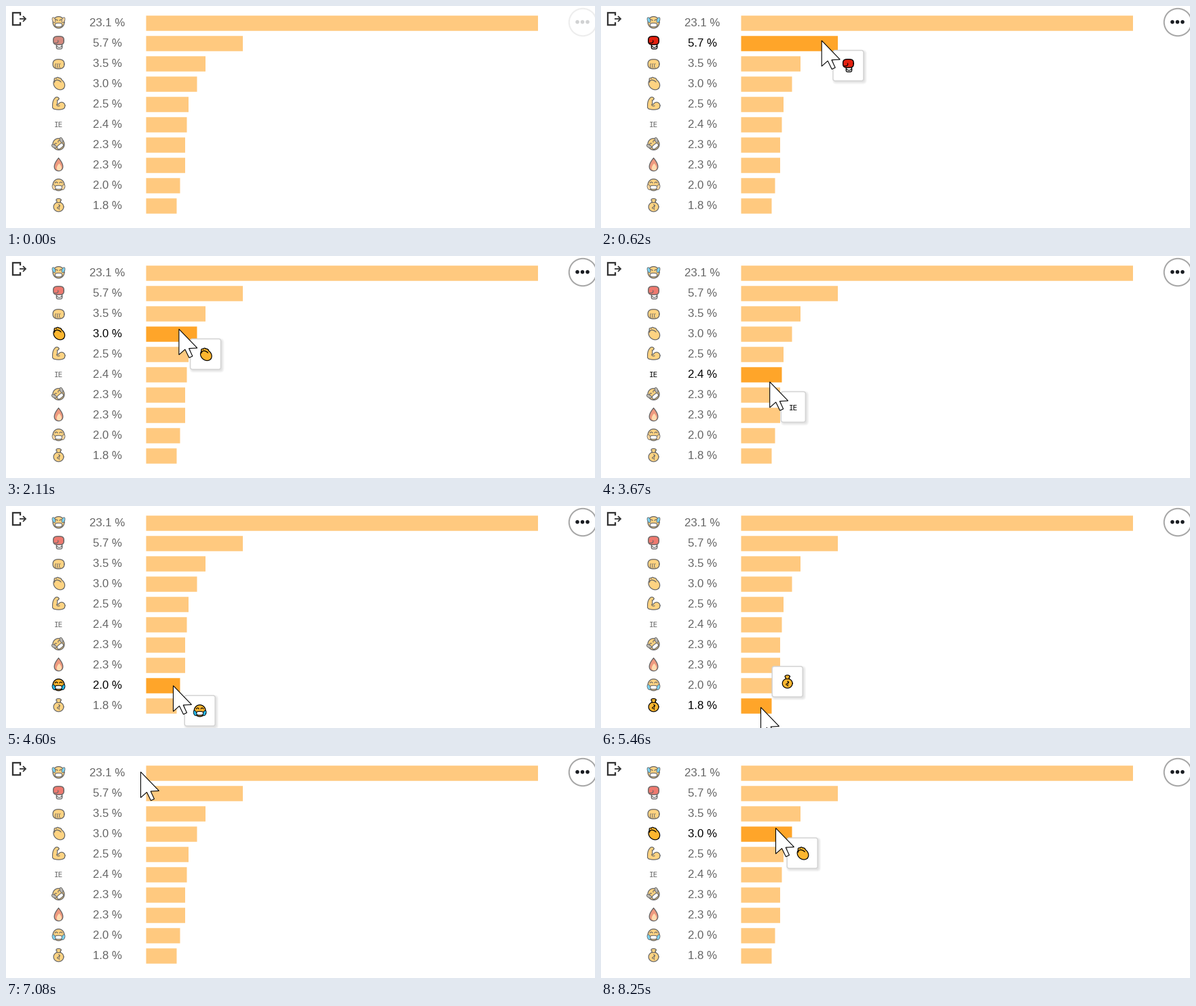
Recreate the animation shown at these times as a matplotlib script. Size 868 by 328 pixels, loop 8.88 s.

```python
import numpy as np
import matplotlib.pyplot as plt
from matplotlib.animation import FuncAnimation
from matplotlib.colors import to_rgb
from matplotlib.patches import Circle, FancyBboxPatch, PathPatch, Polygon, Rectangle
from matplotlib.path import Path
from matplotlib.transforms import Affine2D

W, H, DPI = 868, 328, 64
LOOP, INTERVAL = 8880, 60
STEPS = 114                      # pointer positions per loop
STEP = LOOP / STEPS

INK, WHITE, AMBER, ORANGE = "#000000", "#ffffff", "#fdb62f", "#ffa529"
BLUE, RED, GREEN, GREY = "#26b4e3", "#e3200f", "#2c9a4a", "#8a857c"
DULL = {BLUE: "#f6bd62", RED: "#b93a28", GREEN: "#4a4238"}
REST = 0.6                       # opacity of rows that are not hovered

SHARES = [23.1, 5.7, 3.5, 3.0, 2.5, 2.4, 2.3, 2.3, 2.0, 1.8]
BAR_X, BAR_Y, BAR_H, ROW_H, SCALE = 206.5, 14.25, 22.5, 30, 25

# pointer stops: arrival step, steps on the way, x, y
START = (860, 15)
STOPS = [
    (12, 12, 288, 53), (17, 1, 286, 64), (22, 5, 255, 89), (29, 3, 254, 118),
    (32, 1, 252, 130), (33, 1, 250, 118), (43, 6, 249, 141), (49, 4, 248, 195),
    (56, 4, 247, 246), (62, 4, 245, 283), (70, 4, 235, 297), (80, 7, 240, 250),
    (82, 2, 240, 238), (91, 7, 198, 23), (99, 5, 256, 122), (106, 3, 257, 106)]

fig = plt.figure(figsize=(W / DPI, H / DPI), dpi=DPI, facecolor="white")
ax = fig.add_axes([0, 0, 1, 1])
ax.set(xlim=(0, W), ylim=(H, 0))
ax.axis("off")


def px(size):
    return size * 72 / DPI


def mix(color, alpha):
    return tuple(1 - (1 - c) * alpha for c in to_rgb(color))


def oval(cx, cy, rx, ry, tilt=0, start=0, end=360, power=1):
    """Ellipse or arc; a power below 1 makes it squarer."""
    a, t = np.radians(np.linspace(start, end, 40)), np.radians(tilt)
    c, s = np.cos(a), np.sin(a)
    x = rx * np.sign(c) * np.abs(c) ** power
    y = ry * np.sign(s) * np.abs(s) ** power
    return np.column_stack([cx + x * np.cos(t) - y * np.sin(t),
                            cy + x * np.sin(t) + y * np.cos(t)])


def drop(cx, cy, rx, ry):
    a = np.linspace(0, 2 * np.pi, 40)
    return np.column_stack([cx + rx * np.sin(a) * np.sin(a / 2), cy - ry * np.cos(a)])


def shape(points, fill, width=1.3):
    return points, fill, width


def arc(*args, width=1.1, **kw):
    return oval(*args, **kw), None, width


def stroke(*points, width=1.1):
    return np.array(points, float), None, width


def merged(*outlines):
    """Several outlines drawn as one body."""
    return [shape(o, AMBER, 2.4) for o in outlines] + [shape(o, AMBER, 0) for o in outlines]


def turned(parts, degrees):
    rot = Affine2D().rotate_deg(degrees)
    return [(rot.transform(p), fill, width) for p, fill, width in parts]


def laughing(tear, height):
    parts = [shape(oval(0, 0, 8.4, 8.6), AMBER),
             shape(oval(0, 3.8, 5.2, 2.8, power=.7), WHITE, 1.1)]
    for side in (-1, 1):
        parts += [arc(3.4 * side, -2.2, 1.9, 1.9, start=190, end=350),
                  shape(oval(7 * side, height, 2.2, 4, tilt=20 * side), tear, .8)]
    return parts


def glove():
    return [shape(oval(1, 5.5, 4.2, 3.8, power=.5), WHITE, 1.3),
            arc(1, 5, 3, 2, start=0, end=180),
            shape(oval(0, -3.2, 7.8, 6.2, power=.65), RED, 1.4),
            arc(-4, -2, 3.4, 2.6, start=-30, end=120)]


def fist():
    fingers = [arc(x, 4, 1.5, 3, start=90, end=270, width=.9) for x in (-3.5, -.5, 2.5)]
    return [shape(oval(0, 1.6, 8.4, 7, power=.8), AMBER)] + fingers


def clapping():
    fingers = [oval(3 * i - 1, abs(i) - 6.2, 1.6, 2.2, tilt=-35) for i in (-1, 0, 1)]
    return merged(*fingers, oval(.8, 1.4, 8.4, 6.8, tilt=42)) + [
        arc(0, 1, 7, 4.6, tilt=42, start=150, end=275, width=1.3)]


def biceps():
    return merged(oval(-5.4, 0, 2.8, 7.5, tilt=8), oval(-2.6, -7.2, 2.4, 1.8),
                  oval(0, 5, 8.4, 3.4), oval(4.4, 3, 4.4, 4.4)) + [
        arc(0, 1, 3, 2.6, start=60, end=170)]


def flame():
    return [shape(drop(0, 0, 8.2, 9.5), "#e2552a"),
            shape(drop(.8, 3.6, 4.6, 5.2), "#ffc47c", 0)]


def money_bag():
    t = np.linspace(-1, 1, 20)
    sign = np.column_stack([-2 * np.sin(np.pi * t), 2.5 + 3 * t])
    return merged(oval(0, -7.6, 3, 1.4), oval(0, -5, 2, 2.6), oval(0, 2.6, 6.8, 6.4)) + [
        (sign, None, 1), stroke((0, -1.6), (0, 6.6), width=.7),
        stroke((-2.4, -4.6), (2.4, -4.6))]


ICONS = [laughing(BLUE, -3.5), glove(), fist(), clapping(), biceps(), None,
         turned(laughing(GREY, -2), -40), flame(), laughing(BLUE, 3.5), money_bag()]


class Icon:
    def __init__(self, parts, x=0, y=0, z=2):
        self.place = Affine2D().translate(x, y)
        trans = self.place + ax.transData
        self.parts, self.label = [], None
        if parts is None:
            self.label = ax.text(0, 1.6, "IE", family="DejaVu Sans Mono", size=px(11),
                                 ha="center", va="center", transform=trans, zorder=z)
            return
        for points, fill, width in parts:
            patch = PathPatch(Path(points), transform=trans, zorder=z, lw=px(width),
                              joinstyle="round", capstyle="round")
            self.parts.append((ax.add_patch(patch), fill, width))

    def paint(self, alpha, dull=False):
        if self.label:
            self.label.set_color(mix(INK, alpha))
        for patch, fill, width in self.parts:
            tone = DULL.get(fill, fill) if dull else fill
            patch.set_facecolor(mix(tone, alpha) if tone else "none")
            patch.set_edgecolor(mix(INK, alpha) if width else "none")

    def show(self, on):
        for artist in [p for p, _, _ in self.parts] or [self.label]:
            artist.set_visible(on)


def line(points, width):
    ax.plot(*zip(*points), color="#333333", lw=px(width), zorder=3,
            solid_joinstyle="miter", solid_capstyle="butt")


def tip(step):
    pos = np.array(START, float)
    for arrival, travel, x, y in STOPS:
        part = np.clip((step - arrival + travel) / travel, 0, 1)
        pos += (1 - (1 - part) ** 2.5) * (np.array([x, y]) - pos)
    return pos


def hovered(step):
    if step < 1:
        return None
    x, y = tip(step)
    for row, share in enumerate(SHARES):
        top = BAR_Y + row * ROW_H
        if BAR_X <= x <= BAR_X + share * SCALE and top <= y <= top + BAR_H:
            return row
    return None


HOVER = [hovered(n) for n in range(STEPS)]
FIRST = {row: HOVER.index(row) for row in set(HOVER) - {None}}

# chart rows
bars, labels, icons = [], [], []
for row, share in enumerate(SHARES):
    y = row * ROW_H
    bars.append(ax.add_patch(Rectangle((BAR_X, BAR_Y + y), share * SCALE, BAR_H,
                                       lw=0, snap=False)))
    labels.append(ax.text(149.5, 30 + y, f"{share:.1f} %", family="Liberation Sans",
                          size=px(16.8), ha="center", va="baseline"))
    icons.append(Icon(ICONS[row], 77.5, 24.2 + y))

# export icon
line([(21, 14), (21, 10), (9.6, 10), (9.6, 28), (21, 28), (21, 24)], 2.3)
line([(19.5, 19), (29, 19)], 1.8)
line([(25, 15), (29, 19), (25, 23)], 1.8)

# menu button
ring = ax.add_patch(Circle((850, 24), 20.2, fc="white", lw=px(2), zorder=3))
dots = [ax.add_patch(Circle((849.5 + 7.5 * i, 23.6), 2.8, lw=0, zorder=4))
        for i in (-1, 0, 1)]

# tooltip
CARD, NARROW = 45, 36            # side of the card, width around the short text
tip_place = Affine2D()
tip_trans = tip_place + ax.transData


def card(offset, grow, z, **style):
    corner = offset - grow
    return ax.add_patch(FancyBboxPatch(
        (corner, corner), CARD + 2 * grow, CARD + 2 * grow, transform=tip_trans,
        boxstyle=f"round,pad=0,rounding_size={3 + grow}", zorder=z, **style))


cards = [(card(2, g, 5, fc="black", lw=0, alpha=.028), g) for g in range(4)]
cards.append((card(0, 0, 6, fc="white", ec="#d4d4d4", lw=px(1.5)), 0))
tip_icons = [Icon(parts, z=7) for parts in ICONS]
for icon in tip_icons:
    icon.paint(1)

# pointer
ARROW = np.array([(0, 0), (0, 38), (9, 30), (15, 42.3), (20, 40), (14.7, 28.6), (27, 28)])
pointer = ax.add_patch(Polygon(ARROW, fc="white", ec="black", lw=px(1.1), zorder=10))


def draw_tooltip(row, x, y):
    for r, icon in enumerate(tip_icons):
        icon.show(r == row)
    for box, _ in cards:
        box.set_visible(row is not None)
    if row is None:
        return
    width = CARD if ICONS[row] else NARROW
    for box, grow in cards:
        box.set_width(width + 2 * grow)
    left = x + 17.2
    top = y + 15 if y + 15 + CARD < H + 2 else y - 15 - CARD
    tip_place.clear().translate(left, top)
    tip_icons[row].place.clear().translate(left + width / 2, top + CARD / 2)


def update(frame):
    step = min(int((frame * INTERVAL + 52) / STEP), STEPS - 1)
    row = HOVER[step]
    for r in range(len(SHARES)):
        alpha = 1 if r == row else REST
        bars[r].set_facecolor(mix(ORANGE, alpha))
        labels[r].set_color(mix(INK, alpha))
        icons[r].paint(alpha, dull=step < FIRST.get(r, 0))
    strength = .2 + .8 * min(1, step * STEP / 400) ** 1.7
    ring.set_edgecolor(mix("#a6a6a6", strength))
    for dot in dots:
        dot.set_facecolor(mix("#1b1e23", strength))
    x, y = tip(step)
    pointer.set_visible(step >= 1)
    pointer.set_xy(ARROW + (x + .5, y + .5))
    draw_tooltip(row, x, y)
    return []


anim = FuncAnimation(fig, update, frames=LOOP // INTERVAL, interval=INTERVAL,
                     init_func=lambda: [], repeat=True, repeat_delay=0, blit=False)
plt.show()
```
